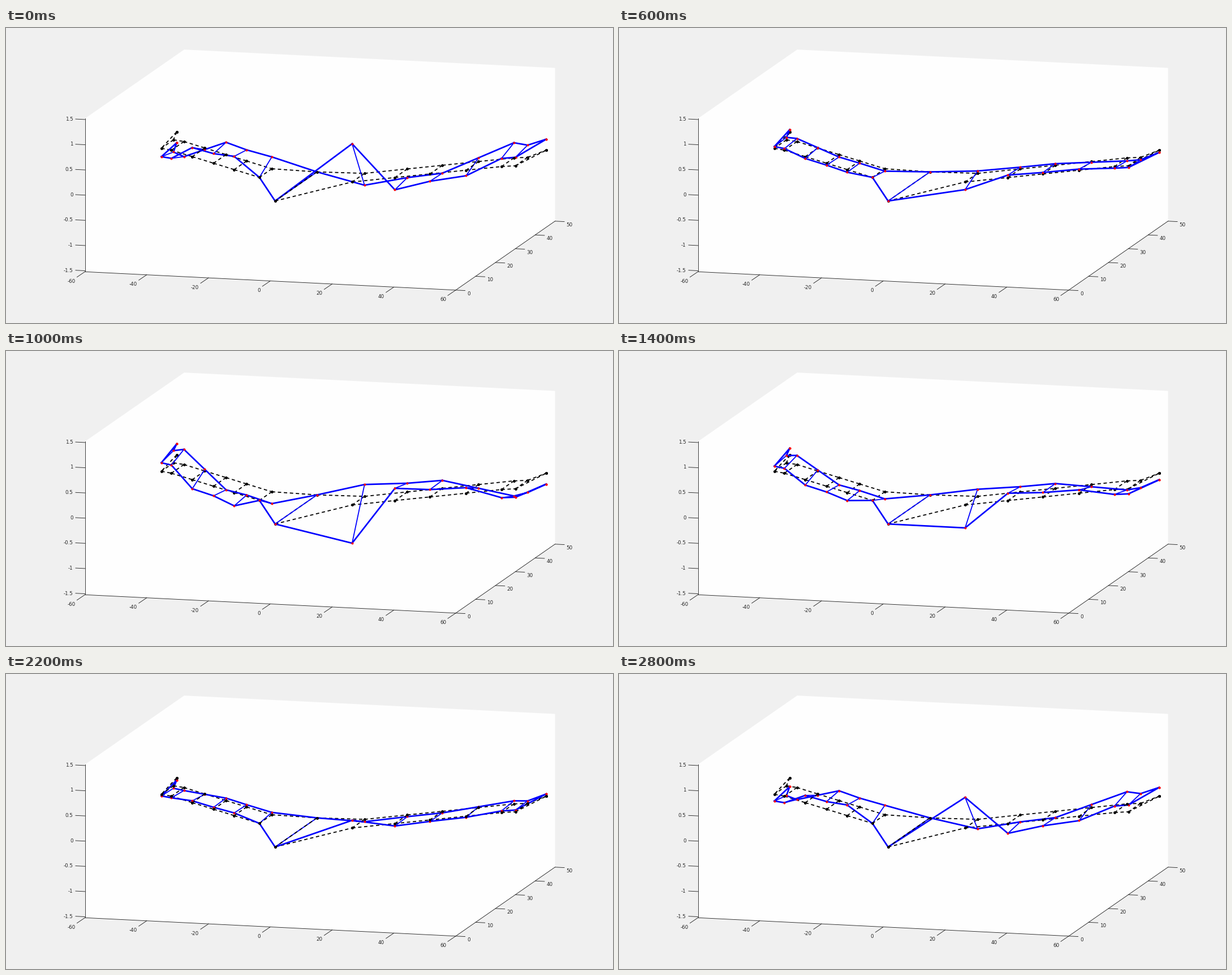
A matplotlib script that plays this animation: 1073x522 px, repeating every 3000 ms.

```python
import numpy as np
import matplotlib.pyplot as plt
from matplotlib.animation import FuncAnimation
from matplotlib.patches import Polygon

W, H, DPI = 1073, 522, 100
FRAMES, STEP = 15, 200
PX = 72 / DPI
INK = "#262626"
X_MAX, Y_MAX, Z_MAX = 60, 50, 1.52


def project(x, y, z):
    """Orthographic view: data coordinates to stage pixels."""
    return (140 + 5.4625 * (x + X_MAX) + 3.51 * y,
            296.2 + 0.2708 * (x + X_MAX) - 2.44 * y - 89.2 * z)


def profile(x, *points):
    """Piecewise linear function of the distance from the middle."""
    return np.interp(np.abs(x), *zip(*points))


# The swept wing: stations along one half, mirrored, with a shared tip
half = np.array([15, 26, 35, 44.3, 53.4, 57.3, 59.8])
span = np.concatenate([-half[::-1], [0], half])

rear_y = profile(span, (0, 23.5), (15, 24.1), (53.4, 39.6), (57.3, 40.4), (59.8, 45.9))
front_y = profile(span, (0, 2.4), (15, 17.85), (53.4, 33.3), (57.3, 34.3), (59.8, 45.9))

# Bending mode: an odd part plus a smaller even part
side = np.sign(span)
rear_mode = (side * profile(span, (0, 0), (15, 0.235), (26, 0.196), (35, 0.2),
                            (53.4, -0.3), (57.3, -0.242), (59.8, -0.217))
             + profile(span, (15, 0), (35, -0.043), (53.4, 0)))
front_mode = (side * profile(span, (0, 0), (15, -0.379), (26, 0.253), (35, 0.168),
                             (44.3, 0.145), (53.4, -0.161), (57.3, -0.168),
                             (59.8, -0.217))
              + profile(span, (0, 0), (15, -0.379), (26, -0.01), (44.3, -0.035),
                        (53.4, 0)))


def wing(s):
    """Rear and front edge in pixels at deflection s."""
    return (np.array(project(span, rear_y, s * rear_mode)),
            np.array(project(span, front_y, s * front_mode)))


def pieces(a, b):
    """Separate lines from each point of a to that of b, split by NaN."""
    return np.stack([a, b, np.full_like(a, np.nan)], axis=2).reshape(2, -1)


def rails_of(rear, front):
    return np.hstack([pieces(p[:, :-1], p[:, 1:]) for p in (rear, front)])


def rungs_of(rear, front):
    return pieces(rear[:, 1:-1], front[:, 1:-1])


def deflection(i):
    """Fast swing up, slower swing back."""
    return np.interp(i, [0, 5, FRAMES], [-1, 1, -1])


fig = plt.figure(figsize=(W / DPI, H / DPI), dpi=DPI, facecolor="#f0f0f0")
ax = fig.add_axes([0, 0, 1, 1])
ax.set_xlim(0.5, W + 0.5)
ax.set_ylim(H + 0.5, 0.5)
ax.axis("off")


def thin(*points):
    ax.plot(*zip(*points), color=INK, lw=0.9 * PX, zorder=1)


def tick(point, value, dx, dy, label_dx, label_dy, ha):
    x, y = point
    thin((x, y), (x + dx, y + dy))
    ax.text(x + label_dx, y + label_dy, f"{value:g}", ha=ha, va="center",
            color=INK, family="DejaVu Sans", fontsize=8.8 * PX)


# Axes box
top = [project(x, y, Z_MAX) for x, y in ((-X_MAX, 0), (-X_MAX, Y_MAX), (X_MAX, Y_MAX))]
base = [project(x, y, -Z_MAX) for x, y in ((X_MAX, Y_MAX), (X_MAX, 0), (-X_MAX, 0))]
ax.add_patch(Polygon(top + base, fc="#fefefe", ec="none", zorder=0))
thin(*base)
thin(base[-1], top[0])

for z in np.arange(-3, 4) / 2:
    tick(project(-X_MAX, 0, z), z, -16.5, -0.8, -21, -0.5, "right")
for x in range(-X_MAX, X_MAX + 1, 20):
    tick(project(x, 0, -Z_MAX), x, -14, 9.5, -17, 17, "right")
for y in range(0, Y_MAX + 1, 10):
    tick(project(X_MAX, y, -Z_MAX), y, 16.5, 0.8, 20, 6.5, "left")


def solid(width):
    return ax.plot([], [], color="blue", lw=width * PX, zorder=3)[0]


def dashed(data):
    return ax.plot(*data, color="black", lw=1.8 * PX, dashes=(3.3, 2.6),
                   dash_capstyle="butt", zorder=2)[0]


def dots(data, color, size, z):
    return ax.plot(*data, "o", color=color, ms=size * PX, mew=0, zorder=z)[0]


# Shape at rest
rest = wing(0)
dashed(rails_of(*rest))
rest_rungs = dashed(rungs_of(*rest))
rest_dots = dots(np.hstack(rest), "black", 5, 2)

# Bent shape
rails, rungs = solid(2.7), solid(1.8)
bent_dots = dots(np.hstack(rest), "red", 4, 4)


def update(i):
    s = deflection(i)
    bent = wing(s)
    rails.set_data(*rails_of(*bent))
    rungs.set_data(*rungs_of(*bent))
    bent_dots.set_data(*np.hstack(bent))
    # Coincident parts swap depth with the bending direction
    rest_rungs.set_zorder(3.5 if s < 0 else 2)
    rest_dots.set_zorder(5 if s < 0 else 2)
    return rails, rungs, bent_dots


anim = FuncAnimation(fig, update, frames=FRAMES, interval=STEP,
                     repeat=True, repeat_delay=0, blit=False)
plt.show()
```
